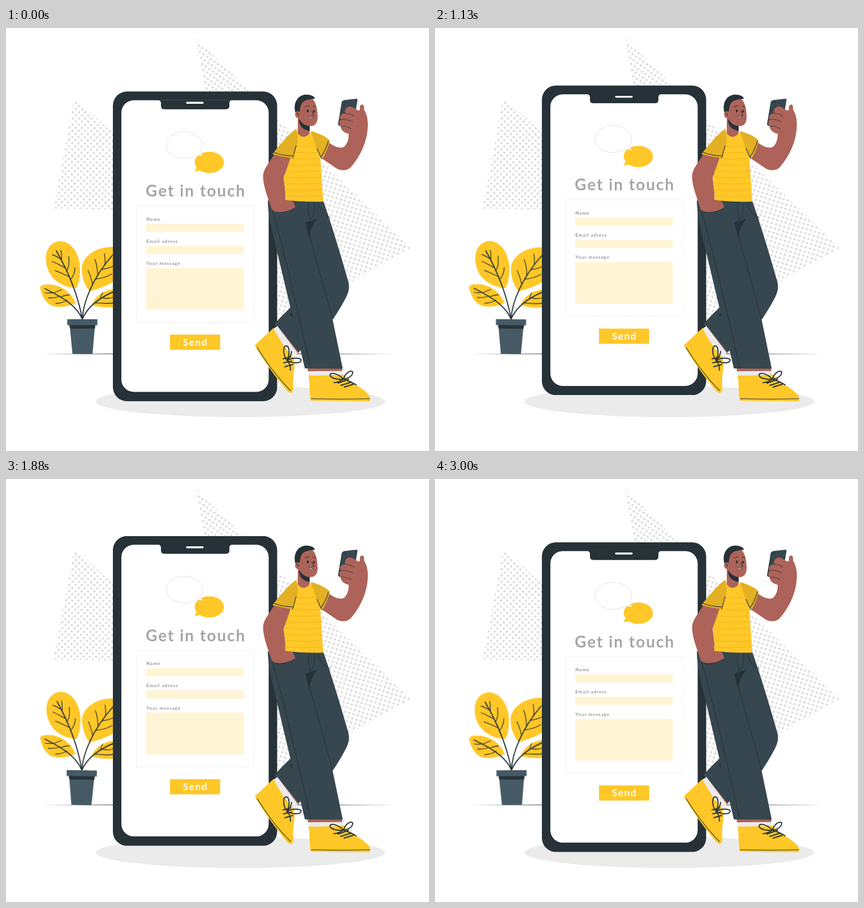
These frames come from a looping animation (748x748 px, 3.04 s). An HTML page:

```html
<!DOCTYPE html>
<html lang="en">
<head>
<meta charset="utf-8">
<title>Get in touch</title>
<style>
  html, body { margin: 0; width: 100%; height: 100%; overflow: hidden; background: #fff; }
  svg { display: block; width: 100vw; height: 100vh; }
  .dark { fill: #263238; }
  .slate { fill: #37474f; }
  .pot { fill: #455a64; }
  .sun { fill: #ffc727; }
  .sleeve { fill: #e2b022; }
  .skin { fill: #ad6359; }
  .sock { fill: #ebebeb; }
  .field { fill: #fff4d4; }
  .line { fill: none; stroke: #263238; stroke-width: 1.1; stroke-linecap: round; stroke-linejoin: round; }
  .stem { stroke-width: 1.9; }
  .vein { stroke-width: 1.3; }
  .lace { stroke-width: 1.9; }
  .crease { fill: none; stroke: #e6b323; stroke-width: .8; }
  text { font-family: Lato, "Open Sans", sans-serif; font-weight: 700; }
  .title { font-size: 28px; letter-spacing: 2px; fill: #a6a6a6; }
  .label { font-size: 8px; letter-spacing: 1px; fill: #929292; }
  .send { font-size: 17.5px; letter-spacing: 1.4px; fill: #fff; }
  #plant { transform-origin: 130px 466px; }
</style>
</head>
<body>
<svg viewBox="0 0 748 748">
  <defs>
    <pattern id="dots" width="11" height="11" patternUnits="userSpaceOnUse" patternTransform="translate(85 316) rotate(1)">
      <g fill="#dcdcdc">
        <circle cx="2.750" cy="2.750" r="2.150"/>
        <circle cx="8.250" cy="8.250" r="2.150"/>
      </g>
    </pattern>
    <pattern id="tilted" href="#dots" patternTransform="translate(716 390) rotate(-28)"/>
    <pattern id="steep" href="#dots" patternTransform="translate(336 18) rotate(-10)"/>
  </defs>

  <path fill="url(#dots)" d="M121 123L230 222V322L84 319Z"/>
  <path fill="url(#steep)" d="M334 16L440 120L354 122Z"/>
  <path fill="url(#tilted)" d="M460 142L717 390L460 532Z"/>

  <ellipse cx="414.5" cy="660.5" rx="256" ry="27.5" fill="#ebebeb"/>
  <path class="dark" d="M64 576.300L200 575.800H550L686 576.300L550 576.800H200Z"/>

  <g id="plant">
    <g class="sun">
      <path d="M124 460C102 459 71 445 70.500 407C71 387 83 377 97 377C116 378 131 400 131 427C131 441 129 453 124 460Z"/>
      <path d="M148 466C138 454 133.500 438 134 423C137 402 160 387 189 387H200V440C184 456 164 460 148 466Z"/>
      <path d="M61 462C58 455 66 453.500 76 453.500C98 454 117 469 123 486C113 492 98 495 84 492C72 488 65 478 61 462Z"/>
      <path d="M152 489C158 474 172 464 190 462H200V494H184C171 494 159 493 152 489Z"/>
    </g>
    <g class="line stem">
      <path d="M135 515C129 482 116 441 89 394"/>
      <path d="M135 515C136 485 154 441 188 402"/>
      <path d="M135 515C126 494 108 480 69 461"/>
      <path d="M135 515C143 495 163 477 196 464"/>
    </g>
    <g class="line vein">
      <path d="M98 411C99 405 98 398 97 393M107 430C111 424 112 413 111 404M114 445C119 439 122 431 122 424M96 408C91 405 86 402 82 401M104 424C96 420 88 415 82 413M112 440C104 436 94 431 87 429"/>
      <path d="M175 419C176 412 175 405 174 399M162 438C162 425 160 416 157 409M153 453C151 443 148 435 145 429M169 427C176 426 184 424 192 420M158 444C168 443 179 440 187 435"/>
      <path d="M85 468C90 466 95 464 98 463M98 475C104 473 108 472 112 472M83 468C76 469 72 469 69 468M96 474C89 477 82 478 75 477M108 481C101 486 95 487 88 487"/>
      <path d="M167 479C168 474 169 471 171 468M158 486C170 487 180 488 190 486M171 477C179 479 185 478 191 476"/>
    </g>
    <path class="pot" d="M112.500 524H157.500L153 576.300H117.500Z"/>
    <path class="dark" d="M112 525H158L157.300 531.500H113Z"/>
    <rect class="pot" x="108.300" y="515" width="53.300" height="10.500"/>
  </g>

  <g id="phone">
    <rect class="dark" x="189" y="112.300" width="290.500" height="547.700" rx="25"/>
    <rect x="204" y="127.800" width="260.500" height="515.700" rx="22" fill="#fff"/>
    <path class="dark" d="M269 127.500Q274 128 274 133V138Q274 143.700 280 143.700H389Q395 143.700 395 138V133Q395 128 400 127.500Z"/>
    <rect x="318.500" y="130.500" width="31" height="3.400" rx="1.700" fill="#fff"/>
    <path class="sun" d="M359.500 219C374 219 385.300 227 385.300 237.800C385.300 248.500 374 256.500 359.500 256.500C353 256.500 347 255 342.500 251.800C340 253 337 253.500 333 253.500C335.500 250.500 337 248 336.500 245.500C334.800 243.200 333.800 240.500 333.800 237.800C333.800 227 345 219 359.500 219Z"/>
    <path fill="#fff" stroke="#dadada" stroke-width=".8" d="M315 183.300C333 183.300 347.500 194 347.500 207C347.500 211 346 215 343.500 218.500C344 221.500 346 224 348.500 226C344 226 340 225 336.500 224.500C331 228.500 323.500 230.800 315 230.800C297 230.800 283.300 220 283.300 207C283.300 194 297 183.300 315 183.300Z"/>
    <text class="title" x="247" y="298">Get in touch</text>
    <rect x="230.500" y="314.500" width="207.500" height="206" fill="none" stroke="#f0f0f0"/>
    <text class="label" x="248.300" y="340.500">Name</text>
    <rect class="field" x="248" y="346" width="172.500" height="14.500"/>
    <text class="label" x="248.300" y="379.700">Email adress</text>
    <rect class="field" x="248" y="385.300" width="172.500" height="14.500"/>
    <text class="label" x="248.300" y="419">Your message</text>
    <rect class="field" x="248" y="424.500" width="172.500" height="74"/>
    <rect class="sun" x="290" y="542.200" width="88.700" height="26.800"/>
    <text class="send" x="335" y="561.500" text-anchor="middle">Send</text>
  </g>

  <g id="man">
    <!-- back leg -->
    <path class="skin" d="M476 523L488 520L521 570L514 578Z"/>
    <path class="sock" d="M471 533L480 527L516 575L507 586Z"/>
    <path class="sun" d="M473 530.500L440 561C455 588 480 622 498 642.500C504 648 508.500 645 508 636C507 624 508 613 510 602C511 594 510 587 508 582C494 567 482 549 473 530.500Z"/>
    <path class="line" d="M444 565C462 594 482 620 503 641"/>
    <path class="slate" d="M530 304H560.500C575 345 591 398 604 444C609 458 606 467 601 477C592 494 585 505 579 514L517 573L476 522C487 509 500 497 513 485Z"/>
    <path class="dark" d="M509 487L517 521L502 507Q508 497 509 487Z"/>
    <g class="line lace">
      <path d="M497 588C489 577 490 563 495 562C502 562 502 577 497 588C507 582 520 583 522 587C522 593 508 594 497 588"/>
      <path d="M497 588C502 592 503 599 503 605M497 588C503 581 505 577 505 572M490 585L503 582M491 592L505 589M493 599L507 595"/>
    </g>

    <!-- front leg -->
    <path class="skin" d="M533 600H594L595 609L534 608Z"/>
    <path class="sock" d="M534 607L595 606.500L597 616L536 617Z"/>
    <path class="sun" d="M535 614.500C555 615 576 614 598 613C605 625 625 633 638 645C644 651 645 656 643 660L539 659C536 645 538 630 535 614.500Z"/>
    <path class="line" d="M540 655.500C575 656.500 610 656.500 643 655.500"/>
    <path class="slate" d="M463 305H550L531 347C545 400 566 470 577 513L595.500 602.500L528.500 602L478 390C470 358 463 328 463 305Z"/>
    <path class="dark" d="M529 344L551 337Q539 350 536 372Z"/>
    <path class="line" d="M531 347C545 400 566 470 577 514M472 325C492 395 516 500 539 601M535 308C534 318 535 329 538 339C544 335 546 325 546 308M552 308C554 322 564 332 573 335"/>
    <g class="line lace">
      <path d="M597 621C586 610 573 608 573 614C574 620 588 622 597 621C599 611 609 604 613 608C614 615 605 620 597 621"/>
      <path d="M597 621C604 624 612 626 619 631M597 621C591 624 585 628 580 627M587 628L606 621M592 632L611 626M598 635L614 630"/>
    </g>

    <!-- arm in pocket -->
    <path class="skin" d="M475 222C466 238 455 249 454.500 262C455 283 465 304 470 321C479 329 501 326 511.500 318C511 312 507 306 503 302L494 304C495 290 492 276 491 264L507 226Z"/>
    <path class="line" d="M478 327C492 327 504 323 511 318"/>

    <!-- raised arm -->
    <path class="slate" d="M597.500 127.500L619.500 125Q622 125 621.500 128L614 172Q613 174 611 174L590 173Q587 172.500 587.500 169L594 131Q595 128 597.500 127.500Z"/>
    <path class="line" d="M594.500 130L588 170"/>
    <circle class="dark" cx="600.500" cy="131" r="1.600"/>
    <path class="skin" d="M569 201C580 210 591 214 598 210C604 204 606 197 606 187C598 186 591 179 592 174C588 170 589 164 592 162C588 157 592 151 600 151C597 143 605 136 613 140C618 143 622 146 625 146C627 142 624 138 628 136C632 133 634 139 633 144C640 155 641 169 639 183C636 208 623 231 610 246C603 253 592 253 584 248C575 242 567 236 557 230Z"/>
    <path class="line" stroke-opacity=".75" d="M600 151C606 151 611 153 615 156M592 162C600 160 607 163 613 166M592 174C599 172 605 175 610 178"/>

    <!-- neck and shirt -->
    <path class="sun" d="M513 180C519 193 530 195 540 184L552 188L556 232L561 307Q526 308 494.500 304C495 290 492 276 491.500 264L503 230Z"/>
    <path id="stripes" class="crease"/>
    <path class="skin" d="M516 155V186C521 194 531 195 537 186V168Z"/>
    <path class="sleeve" d="M514 178C501 186 489 201 471 223Q488 228 506 230C510 218 515 208 516 199Z"/>
    <path class="sleeve" d="M539 182C555 187 565 191 572.500 199C570 211 565 222 560 231Q552 223 549 212Z"/>
    <path class="line" d="M474 220C485 224 497 226 507 226M570 200C567 211 562 221 557 228M507 230L513 208M558 231L550 213"/>

    <!-- head -->
    <path class="skin" d="M517 147C517 131 528 124 540 124C548 129 551 144 551 158C551 168 546 173.500 539 173.500C530 173.500 521 167 517 158Z"/>
    <path class="dark" d="M512 150C507 134 515 120 528 118C537 117 545 120 546.500 125C540 126 531 126 525 131C520 136 521 142 519 148L516 150Z"/>
    <ellipse class="skin" cx="515.800" cy="153" rx="4.600" ry="6"/>
    <path class="dark" d="M518 161C518 172 524 180 537 182V173.500C529 173 523 168 518 161Z"/>
    <ellipse class="dark" cx="533.700" cy="146.500" rx="1.800" ry="2.700"/>
    <ellipse class="dark" cx="544.800" cy="147" rx="1.600" ry="2.500"/>
    <path class="line" d="M529 140C531 138 534 137 536 138M543 139C545 138 547 138 548 140M541 147C543 151 545 153 544 155L541 155M514 151C516 150 517 152 517 155"/>
    <path fill="#fff" stroke="#263238" stroke-width=".7" d="M535 156C538 158 541 159 544 158C542 161 537 161 535 156Z"/>
  </g>
</svg>
<script>
  const LOOP = 3040;
  const $ = id => document.getElementById(id);

  // Each step is [time, value].
  function play(id, steps, pose) {
    const frames = steps.map(([time, value]) => ({ offset: time / LOOP, transform: pose(value) }));
    $(id).animate(frames, { duration: LOOP, iterations: Infinity }).startTime = 0;
  }

  const rows = Array.from({ length: 9 }, (_, i) => 209 + i * 11);
  $('stripes').setAttribute('d', rows.map(y => {
    const left = Math.max(493, 513 - (y - 205) * 0.42);
    const right = 552 + (y - 205) * 0.085;
    return `M${left} ${y}Q${(left + right) / 2} ${y + 2} ${right} ${y}`;
  }).join(''));

  play('phone', [[0, 0], [1560, -14.6], [LOOP, 0]], y => `translateY(${y}px)`);
  play('plant', [[0, 0], [560, 0], [830, .25], [1380, .85], [1800, 1.05], [2330, .6], [3000, -.4], [LOOP, -.4]],
    angle => `rotate(${angle}deg)`);
</script>
</body>
</html>
```
